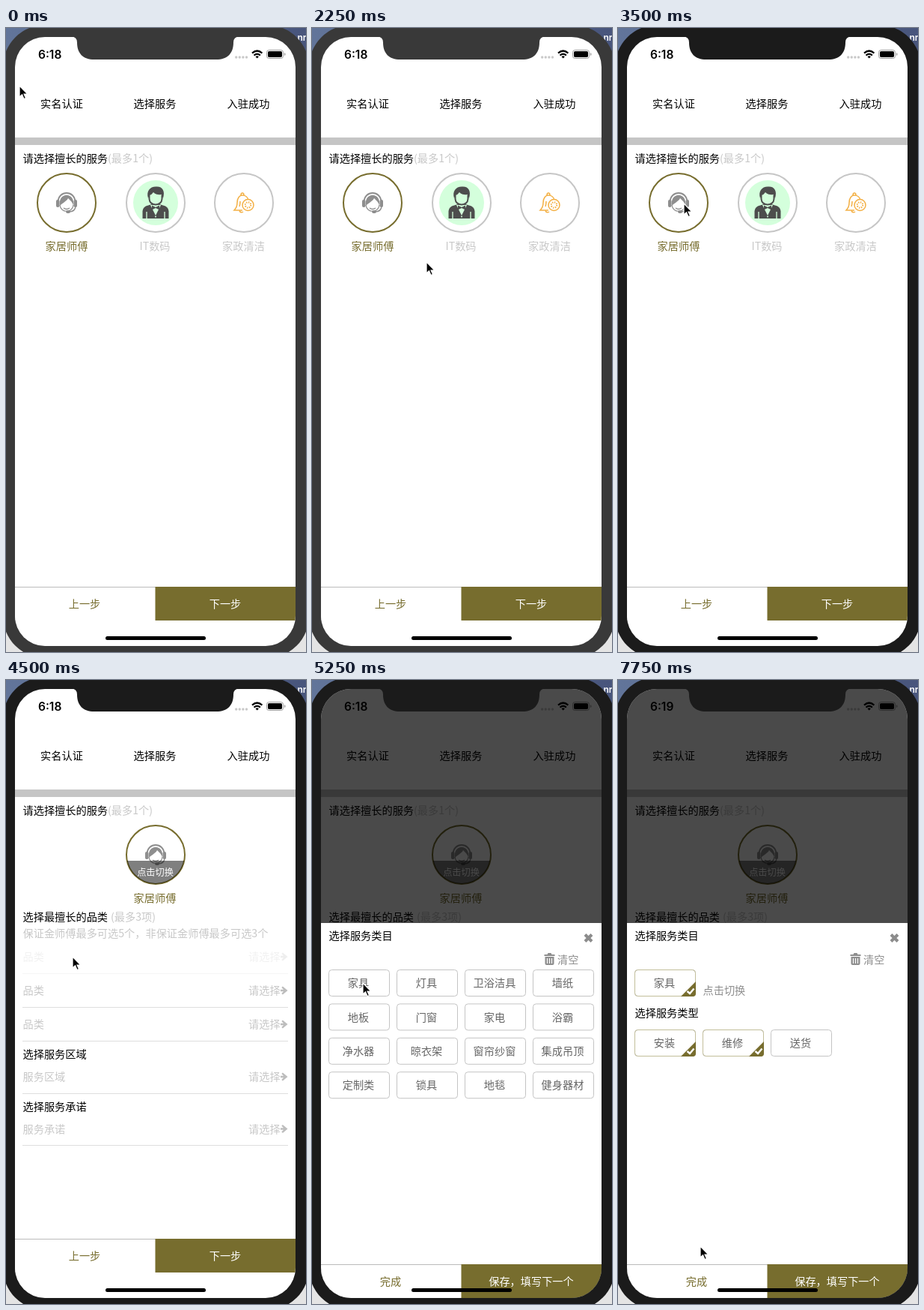
Recreate the animation shown at these times as an HTML page. Size 401 px wide and 832 px high, loop 8 s.

```html
<!DOCTYPE html>
<html lang="zh-CN">
<head>
<meta charset="utf-8">
<title>选择服务</title>
<style>
html, body { margin: 0; width: 100%; height: 100%; overflow: hidden; background: #e4e4e4; }
svg { display: block; width: 401px; height: 832px; }
text { font: 14.2px "Noto Sans CJK SC", "Noto Sans CJK JP", sans-serif; fill: #000; }
.mid { text-anchor: middle; }
.pale { fill: #c8c8c8; }
.olive { fill: #776d2e; }
.white { fill: #fff; }
.grey { fill: #8e8e8e; }
.dark { fill: #666; }
.small { font-size: 12.2px; }
.clock { font: 600 15.5px Inter, sans-serif; }
.menu { font: 600 12px Inter, sans-serif; fill: #fff; }
.rule { stroke: #dedede; }
.chip rect { fill: #fff; stroke: #c4c4c4; }
.chip.on rect, .tick rect { fill: none; stroke: #c3bf9b; }

.bezel, .home, .form, .press, .shade, .sheet, .grid, .picked,
.early, .late, .pick1, .pick2, .cursor { animation: 8s step-end infinite; }
.bezel { animation-name: bezel; }
.home { animation-name: home; }
.form { animation-name: form; }
.press { animation-name: press; }
.shade { animation-name: shade; }
.sheet { animation-name: sheet; }
.grid { animation-name: grid; }
.picked { animation-name: picked; }
.early { animation-name: early; }
.late { animation-name: late; }
.pick1 { animation-name: pick1; }
.pick2 { animation-name: pick2; }
.cursor { animation-name: cursor; }

@keyframes bezel { 0% { fill: #393939 } 43.75%, 100% { fill: #1b1b1b } }
@keyframes home { 0% { visibility: visible } 46.875%, 100% { visibility: hidden } }
@keyframes form { 0% { visibility: hidden } 46.875%, 100% { visibility: visible } }
@keyframes press { 0% { opacity: 1 } 56.25% { opacity: .25 } 59.375%, 100% { opacity: 1 } }
@keyframes shade { 0% { opacity: 0 } 59.375% { opacity: .67 } 62.5%, 100% { opacity: .71 } }
@keyframes sheet {
  0% { transform: translateY(840px) }
  59.375% { transform: translateY(371px) }
  62.5%, 100% { transform: translateY(324px) }
}
@keyframes grid { 0% { visibility: visible } 68.75%, 100% { visibility: hidden } }
@keyframes picked { 0% { opacity: 0 } 68.75%, 100% { opacity: 1 } }
@keyframes early { 0% { visibility: visible } 75%, 100% { visibility: hidden } }
@keyframes late { 0% { visibility: hidden } 75%, 100% { visibility: visible } }
@keyframes pick1 { 0% { opacity: 0 } 84.375%, 100% { opacity: 1 } }
@keyframes pick2 { 0% { opacity: 0 } 90.625%, 100% { opacity: 1 } }
@keyframes cursor {
  0% { transform: translate(18px, 77px) }
  3.125% { transform: translate(78px, 120px) }
  6.25% { transform: translate(120px, 157px) }
  18.75% { transform: translate(120px, 149px) }
  21.875% { transform: translate(128px, 190px) }
  25% { transform: translate(142px, 255px) }
  28.125% { transform: translate(153px, 312px) }
  31.25% { transform: translate(155px, 328px) }
  34.375% { transform: translate(118px, 275px) }
  37.5% { transform: translate(90px, 240px) }
  40.625% { transform: translate(88px, 234px) }
  50% { transform: translate(88px, 300px) }
  53.125% { transform: translate(89px, 369px) }
  62.5% { transform: translate(78px, 398px) }
  65.625% { transform: translate(68px, 404px) }
  75% { transform: translate(84px, 450px) }
  78.125% { transform: translate(97px, 484px) }
  87.5% { transform: translate(150px, 486px) }
  93.75% { transform: translate(128px, 640px) }
  96.875%, 100% { transform: translate(110px, 755px) }
}
</style>
</head>
<body>
<svg id="stage" viewBox="0 0 401 832">
  <defs>
    <linearGradient id="sky"><stop stop-color="#62759a"/><stop offset="1" stop-color="#48557c"/></linearGradient>
    <clipPath id="screen"><rect x="12" y="12" width="375" height="812" rx="40"/></clipPath>
    <clipPath id="disc"><circle cx="200" cy="233" r="39"/></clipPath>

    <g id="agent" fill="none" stroke="#8e8e8e">
      <path d="M-11.5-1C-11-17 11-17 11.5-1" stroke-width="2"/>
      <path d="M-9 3C-8 14 8 14 9 3" stroke-width="1.2"/>
      <path d="M-4 7Q0 10 4 7" stroke-width="1.3"/>
      <path d="M12 4C12 10 8 12 3 12" stroke-width="1.4"/>
      <g fill="#8e8e8e" stroke="none">
        <path d="M-9 4C-12-15 12-15 9 4C8-1 5-3 2-6C0-2-5 0-9 4Z"/>
        <rect x="-14" y="-4" width="4.5" height="10" rx="2"/>
        <rect x="9.5" y="-4" width="4.5" height="10" rx="2"/>
        <rect x="-1" y="10.3" width="6" height="3.6" rx="1.8"/>
      </g>
    </g>

    <g id="waiter">
      <circle r="30" fill="#d4ffdc"/>
      <path d="M-17.5 21V11Q-17 5-10 3.500L-5 2H5L10 3.500Q17 5 17.500 11V21Z" fill="#4d4d4d"/>
      <path d="M-7 3L0 17L7 3Z" fill="#d4ffdc"/>
      <path d="M-5 3.500L0 6L5 3.500V9.500L0 7L-5 9.500Z" fill="#4d4d4d"/>
      <path d="M-12 12V21M12 12V21" stroke="#d4ffdc" stroke-width="1.300"/>
      <g fill="#d4ffdc"><circle cy="14" r="1"/><circle cy="18.500" r="1"/></g>
      <path d="M-8.500-10V-5C-8 5 8 5 8.500-5V-10" fill="#d4ffdc" stroke="#4d4d4d" stroke-width="2"/>
      <path d="M-10-6C-13-16-7-22 1-21.500C9-22 13-16 10-6L7.500-11Q1-10-3-14Q-5-11-8-10Z" fill="#4d4d4d"/>
    </g>

    <g id="bell" fill="none" stroke="#f3b045" stroke-width="1.500">
      <path d="M-2 10H-13Q-9 6-9 0C-9-6-6-10-2-10S5-7 6-4M-4-10Q-4-13-2-13T0-10M-6 11Q-4 14-1 12M-6 5Q-5 2-5-2"/>
      <circle cx="5.500" cy="3" r="7.500" fill="#fff"/>
      <circle cx="5.500" cy="3" r="3.700" stroke-width="2.200" stroke-dasharray="1.400 1.500"/>
    </g>

    <path id="arrow" d="M0-1.200H4L1.300-3.900L2.900-5.500L9.500 0L2.900 5.500L1.300 3.900L4 1.200H0Z" transform="translate(367 0)" fill="#bdbdbd"/>

    <g id="tick">
      <path d="M82 16V32Q82 36 78 36H62Z" fill="#776d2e"/>
      <path d="M70.500 29L74 32L79.500 25.500" fill="none" stroke="#fff" stroke-width="2.400"/>
    </g>

    <g id="trash" fill="#8e8e8e">
      <path d="M-7-6H-3L-2-8H2L3-6H7V-4H-7Z"/>
      <path d="M-6-3H6V6Q6 8 4 8H-4Q-6 8-6 6Z"/>
      <path d="M-3-1V6M0-1V6M3-1V6" stroke="#fff" stroke-width="1.200"/>
    </g>
  </defs>
</svg>
<script>
const text = (x, y, s, cls = '') => `<text x="${x}" y="${y + 5.2}" class="${cls}">${s}</text>`;
const mid = (x, y, s, cls = '') => text(x, y, s, 'mid ' + cls);
const line = (x1, x2, y, cls = 'rule') => `<path class="${cls}" d="M${x1} ${y}H${x2}"/>`;
const use = (id, x, y) => `<use href="#${id}" x="${x}" y="${y}"/>`;
const group = (cls, ...parts) => `<g class="${cls}">${parts.join('')}</g>`;
const ring = (x, color) => `<circle cx="${x}" cy="233" r="39" fill="none" stroke="${color}" stroke-width="2"/>`;

const row = (y, name, lineY, cls = '') => group(cls,
  text(22.5, y, name, 'pale'), text(324, y, '请选择', 'pale'), use('arrow', 0, y), line(22, 377, lineY));

const chip = (x, y, name) => `<g class="chip" transform="translate(${x} ${y})">
  <rect x=".5" y=".5" width="81" height="35" rx="4"/>${mid(40, 18, name, 'dark')}</g>`;
const ticked = (x, y, cls) => `<g transform="translate(${x} ${y})"><g class="tick ${cls}">
  <rect x=".5" y=".5" width="81" height="35" rx="4"/><use href="#tick"/></g></g>`;

const footer = (y, h, left, right) => `<rect x="12" y="${y}" width="188" height="${h}" fill="#fff"/>
  ${line(12, 200, y + .5, 'edge" stroke="#bbb')}
  <rect x="199.5" y="${y}" width="187.5" height="${h}" fill="#776d2e"/>
  ${mid(105, y + 23, left, 'olive')}${mid(293, y + 23, right, 'white')}`;

const status = `
  <text x="43" y="40.500" class="clock early">6:18</text>
  <text x="43" y="40.500" class="clock late">6:19</text>
  <g fill="#c9c9c9">${[0, 1, 2, 3].map(i => `<circle cx="${307.7 + i * 4.6}" cy="39" r="1.700"/>`).join('')}</g>
  <g fill="none" stroke="#000" stroke-width="2.300">
    <path d="M329 33.500Q335.700 27.500 342.400 33.500M331.500 36.500Q335.700 32.800 339.900 36.500"/>
    <path d="M333.500 38.200Q335.700 36.500 337.900 38.200L335.700 40.500Z" fill="#000" stroke="none"/>
  </g>
  <rect x="348.500" y="29.500" width="22" height="11" rx="3" fill="none" stroke="#9a9a9a"/>
  <rect x="350" y="31" width="19" height="8" rx="1.700"/>
  <path d="M372 33V37Q373.500 36.500 373.500 35T372 33Z" fill="#9a9a9a"/>`;

const page = `<rect width="401" height="832" fill="#fff"/>
  ${mid(74.5, 101, '实名认证')}${mid(199, 101, '选择服务')}${mid(324, 101, '入驻成功')}
  <rect x="12" y="146" width="375" height="10" fill="#c5c5c5"/>
  ${text(22.5, 174, '请选择擅长的服务')}${text(136, 174, '(最多1个)', 'pale')}
  ${footer(745, 45, '上一步', '下一步')}`;

const home = group('home',
  use('agent', 81, 233), ring(81, '#776d2e'), mid(81, 290.5, '家居师傅', 'olive'),
  use('waiter', 200, 233), ring(200, '#c6c6c6'), mid(199, 291, 'IT数码', 'pale'),
  use('bell', 318, 233), ring(318, '#c6c6c6'), mid(317.5, 290.5, '家政清洁', 'pale'));

const form = group('form',
  use('agent', 200, 233), ring(200, '#776d2e'),
  '<rect x="160" y="241" width="80" height="32" fill="#000" opacity=".5" clip-path="url(#disc)"/>',
  mid(199.5, 255.5, '点击切换', 'white small'), mid(199, 290.5, '家居师傅', 'olive'),
  text(22.5, 316, '选择最擅长的品类'), text(140, 316, '(最多3项)', 'pale'),
  text(22.5, 338, '保证金师傅最多可选5个，非保证金师傅最多可选3个', 'pale'),
  row(369, '品类', 391.5, 'press'), row(414, '品类', 436.5), row(459, '品类', 481.5),
  text(22.5, 499, '选择服务区域'), row(529, '服务区域', 551.5),
  text(22.5, 568.5, '选择服务承诺'), row(598.5, '服务承诺', 620.5));

const goods = '家具 灯具 卫浴洁具 墙纸 地板 门窗 家电 浴霸 净水器 晾衣架 窗帘纱窗 集成吊顶 定制类 锁具 地毯 健身器材'.split(' ');
const sheet = group('sheet',
  '<rect x="12" width="375" height="500" fill="#fff"/>',
  text(22.5, 17, '选择服务类目'),
  '<path d="M365 15.500L374 24.500M374 15.500L365 24.500" stroke="#8c8c8c" stroke-width="4"/>',
  use('trash', 317.5, 48), text(328, 49, '清空', 'grey'),
  chip(22, 62, goods[0]),
  group('grid', ...goods.slice(1).map((name, i) =>
    chip(22 + (i + 1) % 4 * 91, 62 + (i + 1 >> 2) * 45.4, name))),
  group('picked',
    ticked(22, 62, ''), text(113.5, 90, '点击切换', 'grey'), text(22.5, 120, '选择服务类型'),
    ...['安装', '维修', '送货'].map((name, i) => chip(22 + i * 91, 142, name)),
    ticked(22, 142, 'pick1'), ticked(113, 142, 'pick2')),
  footer(455, 45, '完成', '保存，填写下一个'));

document.getElementById('stage').insertAdjacentHTML('beforeend', `
  <rect width="401" height="832" fill="#e4e4e4"/>
  <rect width="401" height="60" fill="url(#sky)"/>
  <text x="389.500" y="17" class="menu">nr</text>
  <rect class="bezel" x="-4" y="-4" width="409" height="844" rx="56"/>
  <g clip-path="url(#screen)">
    ${page}${home}${form}${status}
    <rect class="shade" width="401" height="832"/>
    ${sheet}
    <rect x="133" y="811" width="134" height="5" rx="2.500"/>
  </g>
  <path class="bezel" d="M87 11Q95 12 95 19C95 34 103 42 118 42H281C296 42 304 34 304 19Q304 12 312 11Z"/>
  <g class="cursor">
    <path d="M0 0V15L3.500 11.800L6 17.500L8.500 16.500L6 11H10.800Z" stroke="#fff" stroke-width="1.200"/>
  </g>`);
</script>
</body>
</html>
```
